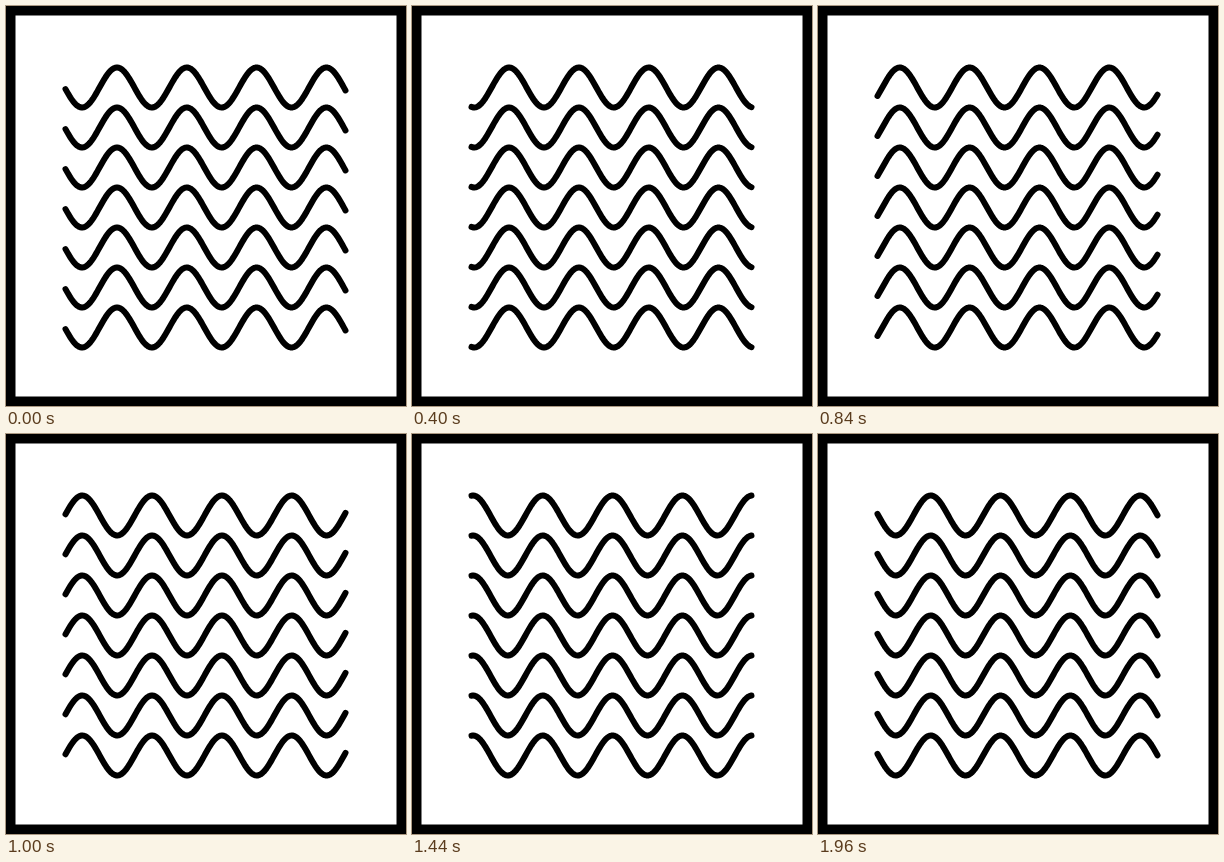
Animation, 400 px wide and 400 px high, one loop 2 s. Source, as an HTML page with a canvas:

```html
<!DOCTYPE html>
<html lang="en">
<head>
<meta charset="utf-8">
<title>Waves</title>
<style>
  html, body { margin: 0; width: 100%; height: 100%; overflow: hidden; background: #fff; }
  canvas { display: block; }
</style>
</head>
<body>
<canvas width="400" height="400"></canvas>
<script>
const ctx = document.querySelector('canvas').getContext('2d');
const LOOP = 2000, STEP = 40, ROWS = 7, GAP = 40;
const LEFT = 59.5, TOP = 81.5, WIDTH = 280, AMP = 20;
const FREQ = 0.09, SPEED = 0.125; // radians per pixel and per step

function drawWave(y, phase) {
  ctx.beginPath();
  for (let x = 0; x <= WIDTH; x++) {
    ctx.lineTo(LEFT + x, y + AMP * Math.sin(FREQ * x + phase));
  }
  ctx.stroke();
}

function draw(now) {
  // The waves slide left in 40 ms steps.
  const phase = 0.08 + SPEED * Math.floor(now % LOOP / STEP);
  ctx.fillStyle = '#000';
  ctx.fillRect(0, 0, 400, 400);
  ctx.fillStyle = '#fff';
  ctx.fillRect(9.5, 9.5, 381, 381);
  ctx.lineWidth = 6;
  ctx.lineCap = ctx.lineJoin = 'round';
  for (let row = 0; row < ROWS; row++) drawWave(TOP + row * GAP, phase);
}

const start = performance.now();
function tick() {
  draw(performance.now() - start);
  requestAnimationFrame(tick);
}
tick();
</script>
</body>
</html>
```
